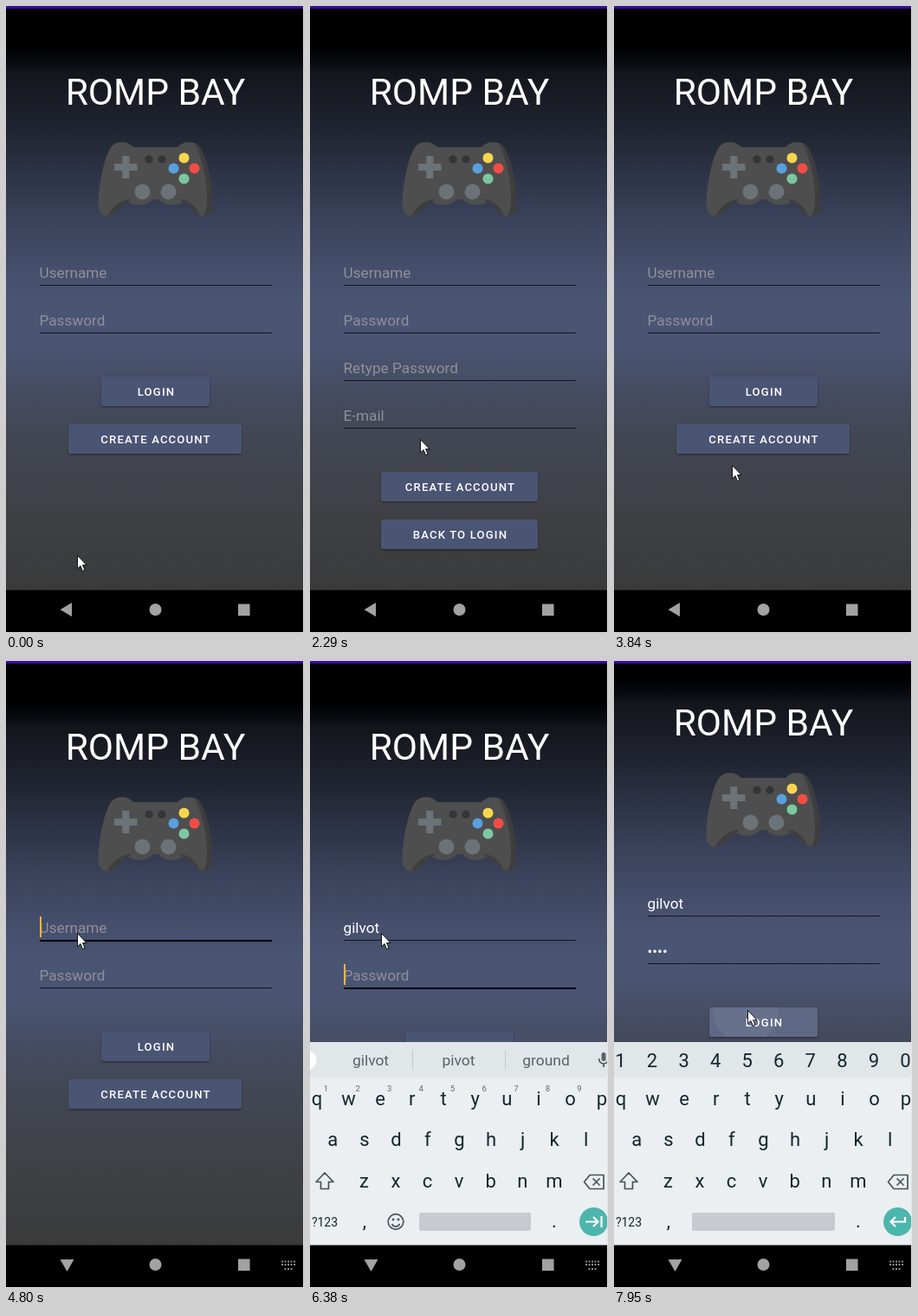
These frames come from a looping animation (344x724 px, 8000 ms). An HTML page:

```html
<!DOCTYPE html>
<html lang="en">
<head>
<meta charset="utf-8">
<title>Login flow</title>
<style>
  html, body { margin: 0; width: 100%; height: 100%; overflow: hidden; background: #000; }
  svg { display: block; width: 344px; height: 724px; font-family: Roboto, sans-serif; }
  .title { font-size: 42.5px; fill: #fff; text-anchor: middle; }
  .hint { font-size: 17.2px; fill: #918f98; }
  .typed { font-size: 17.2px; fill: #fff; }
  .label { font-size: 13.1px; font-weight: 500; letter-spacing: 1.16px; fill: #fff; text-anchor: middle; }
  .key { font-size: 22px; fill: #14272f; text-anchor: middle; }
  .sup { font-size: 9.5px; fill: #5c686e; text-anchor: middle; }
  .word { font-size: 17.4px; fill: #56636a; text-anchor: middle; }
  .icon { fill: none; stroke: #46535a; stroke-width: 1.7; stroke-linejoin: round; }
  .enter { fill: none; stroke: #fff; stroke-width: 2.2; }
</style>
</head>
<body>
<svg viewBox="0 0 344 724">
  <defs>
    <linearGradient id="sky" x1="0" y1="0" x2="0" y2="724" gradientUnits="userSpaceOnUse">
      <stop offset="0.062" stop-color="#000"/>
      <stop offset="0.09" stop-color="#070a10"/>
      <stop offset="0.105" stop-color="#13151b"/>
      <stop offset="0.2" stop-color="#212532"/>
      <stop offset="0.28" stop-color="#2f364a"/>
      <stop offset="0.35" stop-color="#3c445d"/>
      <stop offset="0.42" stop-color="#454e6b"/>
      <stop offset="0.48" stop-color="#4a5574"/>
      <stop offset="0.54" stop-color="#4a5573"/>
      <stop offset="0.62" stop-color="#454b60"/>
      <stop offset="0.7" stop-color="#424652"/>
      <stop offset="0.8" stop-color="#3f4146"/>
      <stop offset="0.93" stop-color="#3a3a3a"/>
    </linearGradient>
    <filter id="drop" x="-10%" y="-20%" width="120%" height="160%">
      <feDropShadow dx="0" dy="1.3" stdDeviation="1.2" flood-color="#000" flood-opacity=".4"/>
    </filter>
  </defs>

  <g id="page">
    <rect width="344" height="724" fill="url(#sky)"/>
    <text class="title" x="172.5" y="114">ROMP BAY</text>
    <g id="pad">
      <path fill="#4e4e4e" d="M147 163C141 156 128 155 121 163C113 175 105 214 107 234C109 243 117 245 124 240C132 234 135 229 141 226C146 231 163 232 169 223H176C182 232 199 231 204 226C210 229 213 234 221 240C228 245 236 243 238 234C240 214 232 175 224 163C217 155 204 156 198 163Z"/>
      <path fill="#3e3e3e" d="M145 223C134 223 123 231 117 242.500C120 242.500 122 241.500 124 240C132 234 135 229 141 226ZM200 223C211 223 219 231 224 241.500L221 240C213 234 210 229 204 226ZM218 159C221 160 223 161 224 163C232 175 240 214 238 234C237 240 233 243 228 242.500C237 230 231 186 218 159Z"/>
      <path stroke="#6b7378" stroke-width="8" d="M125 186H151.500M138.300 173V199"/>
      <g fill="#353535"><circle cx="165" cy="177" r="4.600"/><circle cx="180" cy="177" r="4.600"/></g>
      <g fill="#6b7378"><circle cx="157.500" cy="214.500" r="9"/><circle cx="187.500" cy="214.500" r="9"/></g>
      <circle cx="205.500" cy="175.500" r="6" fill="#fcd54f"/>
      <circle cx="193.500" cy="187.500" r="6" fill="#5a9ee0"/>
      <circle cx="217.500" cy="187.500" r="6" fill="#f04e45"/>
      <circle cx="205.500" cy="199.500" r="6" fill="#7cc8a0"/>
    </g>
    <g id="fields"></g>
    <rect id="caret" width="2" height="24" fill="#f0b545"/>
    <g id="login"></g>
    <g id="register"></g>
    <circle id="ripple" fill="#fff"/>
  </g>

  <g id="board">
    <rect y="440" width="344" height="235" fill="#ebeff1"/>
    <rect y="440" width="344" height="41" fill="#e1e6e9"/>
    <g id="keys"></g>
    <path class="icon" d="M17 591L7 601.500H12.500V609.500H21.500V601.500H27Z"/>
    <path class="icon" d="M323 593.500H339V609.500H323L316.500 601.500ZM326.500 597.500L334.500 605.500M334.500 597.500L326.500 605.500"/>
    <text class="key" x="17" y="652.500" style="font-size:14px">?123</text>
    <rect id="space" y="637" height="21" rx="2" fill="#c7cbcf"/>
    <circle cx="327.500" cy="647.500" r="16.500" fill="#4db6ac"/>
    <g id="wordMode">
      <circle cx="-4" cy="461" r="11.500" fill="#fff"/>
      <path d="M118.500 449V472M225.500 449V472" stroke="#c3cacd"/>
      <g id="words"></g>
      <rect x="336.500" y="452" width="5" height="10" rx="2.500" fill="#56636a"/>
      <path class="icon" d="M333.500 459C333.500 467 344.500 467 344.500 459M339 465V469"/>
      <g id="sups"></g>
      <circle class="icon" cx="99" cy="647.500" r="8.800"/>
      <path class="icon" d="M94.500 650C96.500 654 101.500 654 103.500 650"/>
      <circle cx="96" cy="645" r="1.400" fill="#46535a"/><circle cx="102" cy="645" r="1.400" fill="#46535a"/>
      <path class="enter" d="M318 647.500H332M327 642L332.500 647.500L327 653M336.500 641V654"/>
    </g>
    <g id="digitMode">
      <g id="digits"></g>
      <path class="enter" d="M336 642V647.500H319.500M325 642L319.500 647.500L325 653"/>
    </g>
  </g>

  <rect y="674.500" width="344" height="50"/>
  <g fill="#a2a2a2">
    <path id="back" d="M62.500 697L76 689V705Z"/>
    <circle cx="172.500" cy="697" r="7"/>
    <rect x="268" y="690.500" width="13.500" height="13.500"/>
    <path id="down" d="M62.500 691H78.500L70.500 705Z"/>
    <path id="mini" d="M318 693.500H334M318 697H334M321.500 702H330.500" fill="none" stroke="#8c8c8c" stroke-width="2" stroke-dasharray="2 1.500"/>
  </g>
  <rect width="344" height="3" fill="#3a08a8"/>
  <path d="M343.500 0V724M0 723.500H344" stroke="#e4e4e4"/>
  <path id="mouse" fill="#fff" stroke="#000" stroke-width=".9" stroke-linejoin="round" d="M.5.5V15.800L4 12.500L6.500 18.500L9 17.400L6.500 11.600H11Z"/>
</svg>

<script>
const $ = id => document.getElementById(id);
const LOOP = 8000;

function add(parent, tag, attrs, text) {
  const el = document.createElementNS('http://www.w3.org/2000/svg', tag);
  for (const name in attrs) el.setAttribute(name, attrs[name]);
  if (text) el.textContent = text;
  return $(parent).appendChild(el);
}

function set(id, attrs) {
  for (const name in attrs) $(id).setAttribute(name, attrs[name]);
}

const show = (id, on) => set(id, { display: on ? 'inline' : 'none' });

// One form row: hint, typed value and underline.
function field(parent, y, hint) {
  return {
    hint: add(parent, 'text', { class: 'hint', x: 38.5, y: y - 8.3 }, hint),
    value: add(parent, 'text', { class: 'typed', x: 38.5, y: y - 8.3 }),
    line: add(parent, 'rect', { x: 39, y, width: 268 })
  };
}

function fill(row, text, focused) {
  row.hint.style.display = text ? 'none' : '';
  row.value.textContent = text;
  row.line.setAttribute('height', focused ? 2 : 1);
  row.line.setAttribute('fill', focused ? '#000' : '#14161d');
}

function button(parent, x, y, width, text) {
  const box = add(parent, 'rect', { x, y, width, height: 34, rx: 3, fill: '#4a5573', filter: 'url(#drop)' });
  add(parent, 'text', { class: 'label', x: x + width / 2 + 1, y: y + 22.4 }, text);
  const clip = add('page', 'clipPath', { id: 'clip' + x + y });
  clip.append(box.cloneNode());
  return box;
}

const user = field('fields', 322, 'Username');
const pass = field('fields', 377, 'Password');
const loginBox = button('login', 110, 428, 125, 'LOGIN');
button('login', 72, 483, 200, 'CREATE ACCOUNT');
fill(field('register', 432, 'Retype Password'), '', false);
fill(field('register', 487, 'E-mail'), '', false);
button('register', 82, 538, 181, 'CREATE ACCOUNT');
button('register', 82, 593, 181, 'BACK TO LOGIN');

const PITCH = 36.55;
function keyRow(parent, chars, x, y, cls = 'key') {
  [...chars].forEach((c, i) => add(parent, 'text', { class: cls, x: x + i * PITCH, y }, c));
}
keyRow('keys', 'qwertyuiop', 8, 512.5);
keyRow('keys', 'asdfghjkl', 26.3, 559.5);
keyRow('keys', 'zxcvbnm', 62.5, 607.5);
keyRow('keys', ',', 63, 654);
keyRow('keys', '.', 282, 654);
keyRow('sups', '1234567890', 18.5, 497, 'sup');
keyRow('digits', '1234567890', 7.5, 469);
const words = [70, 171.5, 272.5].map(x => add('words', 'text', { class: 'word', x, y: 467 }));

// Tracks: [time, ...values], each held until the next entry.
const mouse = [
  [0, 82, 634], [840, 64, 580], [960, 55, 542], [1110, 85, 533], [1230, 118, 519],
  [1380, 126, 506], [1530, 128, 502], [1650, 127, 500], [2680, 138, 525], [2800, 162, 568],
  [2930, 177, 595], [3080, 166, 604], [3200, 159, 610], [3840, 136, 530], [3960, 102, 410],
  [4080, 79, 334], [4230, 83, 324], [4380, 82, 318], [4500, 82, 314], [7450, 90, 328],
  [7570, 113, 362], [7690, 138, 390], [7810, 153, 401], [7950, 154, 403]
];
const ripples = [
  [0], [1910, 127, 500, 55, 'clip72483'], [2030, 127, 500, 141, 'clip72483'], [2290],
  [3470, 160, 611, 45, 'clip82593'], [3590, 160, 611, 105, 'clip82593'], [3720],
  [7950, 152, 431, 38, 'clip110428']
];
const typing = [
  [0, '', 'thanks', 'I', 'we'], [5530, 'g', 'good', 'g', 'get'], [5670, 'gi', 'give', 'gift', 'giving'],
  [5950, 'gilv', 'guilt', 'gilv', 'ground'], [6100, 'gilvot', 'gilvot', 'pivot', 'ground']
];
const dots = [[0, ''], [6620, '•'], [6770, '••••']];
const pan = [[0, 0], [7020, -26], [7140, -28]];
const rise = [[0, 235], [4920, 80], [5040, 0]];

const at = (track, t) => track.filter(step => step[0] <= t).pop().slice(1);

function draw(t) {
  const within = (a, b) => t >= a && t < b;
  const [x, y] = at(mouse, t);
  set('mouse', { transform: `translate(${x} ${y})` });
  set('page', { transform: `translate(0 ${at(pan, t)})` });

  const registering = within(2290, 3720);
  show('login', !registering);
  show('register', registering);

  const [name, ...hints] = at(typing, t);
  const [secret] = at(dots, t);
  const inUser = within(4650, 6380), inPass = within(6380, 7020);
  fill(user, name, inUser);
  fill(pass, secret, inPass);
  words.forEach((el, i) => el.textContent = hints[i]);

  show('caret', within(4800, 5160) || within(5530, 7020));
  const row = inPass ? pass : user;
  const length = row.value.textContent ? row.value.getComputedTextLength() : 0;
  set('caret', { x: 39 + length, y: inPass ? 350 : 295 });

  loginBox.setAttribute('fill', t >= 7950 ? '#5e6885' : t >= 7020 ? '#757b94' : '#4a5573');
  const [cx, cy, r, clip] = at(ripples, t);
  show('ripple', r);
  if (r) set('ripple', { cx, cy, r, 'fill-opacity': t >= 7950 ? 0.06 : 0.15, 'clip-path': `url(#${clip})` });

  const open = t >= 4800, digits = t >= 6500;
  show('back', !open);
  show('down', open);
  show('mini', open);
  show('board', t >= 4920);
  set('board', { transform: `translate(0 ${at(rise, t)})` });
  show('wordMode', !digits);
  show('digitMode', digits);
  set('space', digits ? { x: 90, width: 165 } : { x: 126, width: 129 });
}

const start = performance.now();
function tick() {
  draw((performance.now() - start) % LOOP);
  requestAnimationFrame(tick);
}
tick();
</script>
</body>
</html>
```
